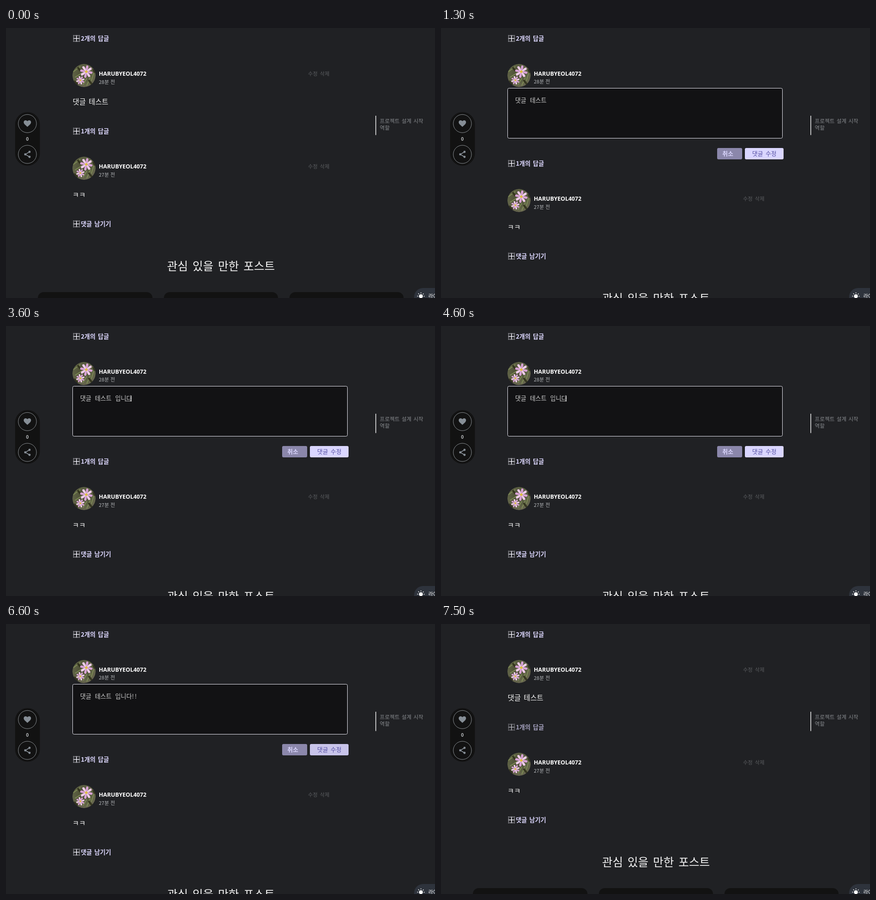
Write an HTML page that moves like this. It is 943 by 594 pixels and loops after 8000 ms.

```html
<!DOCTYPE html>
<html lang="ko">
<head>
<meta charset="utf-8">
<title>댓글 수정</title>
<style>
  html, body { margin: 0; width: 100%; height: 100%; overflow: hidden; background: #202124; }
  svg { display: block; width: 943px; height: 594px; }
  text { font-family: "Noto Sans CJK KR", "Noto Sans CJK", sans-serif; white-space: pre; }
  .reply { font-size: 13.3px; font-weight: 700; fill: #dcd7ff; word-spacing: 1.5px; }
  .name { font: 700 12.5px "Open Sans", sans-serif; fill: #fff; }
  .age { font-size: 11px; fill: #b4b7ba; }
  .action { font-size: 11.3px; fill: #5b5d60; }
  .body { font-size: 15.7px; fill: #f4f4f4; word-spacing: 2px; }
  .toc { font-size: 11.9px; fill: #85888c; word-spacing: .8px; }
  .heading { font-size: 25px; fill: #f4f4f4; word-spacing: 3px; }
  .input { font-size: 13.3px; font-weight: 300; fill: #cfcfcf; word-spacing: 4.2px; }
  .bang { letter-spacing: 2.1px; }
  .button { font-size: 13px; font-weight: 500; word-spacing: 2px; }
</style>
</head>
<body>
<svg viewBox="0 0 943 594">
  <defs>
    <radialGradient id="grass" cx=".45" cy=".4" r=".65">
      <stop offset="0" stop-color="#4b4c33"/>
      <stop offset=".6" stop-color="#5c6043"/>
      <stop offset="1" stop-color="#6b6853"/>
    </radialGradient>
    <clipPath id="round"><circle r="25.5"/></clipPath>
    <g id="petals">
      <path id="petal" d="M0 0C-3-5-3.500-12-1.500-14L2-13C3-10 2.500-5 0 0Z" fill="#d9a3d6"/>
    </g>
    <g id="avatar" clip-path="url(#round)">
      <circle r="25.5" fill="url(#grass)"/>
      <path d="M-24-8L-8-20M-20 4L-4-6M6 22L14 4M-2 20L6 6M16 12L22-8" stroke="#7d8a55" stroke-width="2"/>
      <path d="M-14-18l6 8M10 10l8 10M-22 12l8 8M20-14l4 8" stroke="#34351f" stroke-width="4"/>
      <use href="#petals" transform="translate(5 -8.500) rotate(12)"/>
      <circle cx="5" cy="-8.500" r="2.800" fill="#dcc03c"/>
      <use href="#petals" transform="translate(-8 10.500) scale(.68) rotate(30)"/>
      <circle cx="-8" cy="10.500" r="2" fill="#dcc03c"/>
    </g>
    <g id="grid" fill="none" stroke="#f0eff8" stroke-width="2" transform="scale(.8)">
      <path d="M4 4H20V20H4Z" stroke-dasharray="2" stroke-dashoffset="1"/>
      <path d="M12 3V21M3 12H21"/>
    </g>
  </defs>

  <rect width="943" height="594" fill="#202124"/>

  <use href="#grid" x="145.4" y="13.4"/>
  <text class="reply" x="164.5" y="27.5">2개의 답글</text>

  <use href="#avatar" x="171.5" y="104.5"/>
  <text class="name" x="204" y="104.5">HARUBYEOL4072</text>
  <text class="age" id="firstAge" x="204" y="123">28분 전</text>

  <g id="reading">
    <text class="action" id="edit" x="664" y="105">수정</text>
    <text class="action" x="690" y="105">삭제</text>
    <text class="body" x="146.5" y="168">댓글 테스트</text>
  </g>

  <g id="editor">
    <rect x="146.5" y="132.5" width="604" height="110" rx="3" fill="#121214" stroke="#e9e8f2"/>
    <text class="input" x="163" y="164"><tspan id="typed"></tspan><tspan class="bang" id="bangs"></tspan></text>
    <rect id="underline" y="164.5" width="12" height="1" fill="#cfcfcf"/>
    <rect id="caret" y="153" width="1" height="13" fill="#e4e4e4"/>
    <rect x="607" y="264" width="55" height="25" rx="3" fill="#8b87ab"/>
    <text class="button" x="618.5" y="281.3" fill="#d8d4fb" style="font-weight: 700">취소</text>
    <rect id="save" x="668" y="264" width="85" height="25" rx="3"/>
    <text class="button" x="684" y="281.3" fill="#5650a4">댓글 수정</text>
  </g>

  <g id="below">
    <g id="replies">
      <use href="#grid" x="145.4" y="217.4"/>
      <text class="reply" x="164.5" y="231.5">1개의 답글</text>
    </g>
    <use href="#avatar" x="171.5" y="308.5"/>
    <text class="name" x="204" y="308.5">HARUBYEOL4072</text>
    <text class="age" x="204" y="327">27분 전</text>
    <text class="action" x="664" y="309">수정</text>
    <text class="action" x="690" y="309">삭제</text>
    <text class="body" x="146" y="373">ㅋㅋ</text>
    <use href="#grid" x="145.4" y="421.4"/>
    <text class="reply" x="164.5" y="435.5">댓글 남기기</text>
    <text class="heading" x="354" y="532.5">관심 있을 만한 포스트</text>
    <g fill="#121212">
      <rect x="70" y="581" width="252" height="60" rx="13"/>
      <rect x="347" y="581" width="251" height="60" rx="13"/>
      <rect x="623" y="581" width="251" height="60" rx="13"/>
    </g>
  </g>

  <rect x="20" y="185" width="54.5" height="118" rx="27" fill="#121212"/>
  <g fill="none" stroke="#8b9094">
    <circle cx="47" cy="210.3" r="20"/>
    <circle cx="47" cy="278" r="20"/>
  </g>
  <path d="M47 217.500L41 212C37 207.500 39.500 203 43 203Q45.500 203 47 205Q48.500 203 51 203C54.500 203 57 207.500 53 212Z" fill="#868e96"/>
  <text x="47" y="248" text-anchor="middle" font-size="10" font-weight="700" fill="#c6c9cb">0</text>
  <g fill="#868e96">
    <path d="M51.500 272.500L42.500 278L51.500 283.500" fill="none" stroke="#868e96" stroke-width="1.7"/>
    <circle cx="51.700" cy="272.500" r="2.400"/>
    <circle cx="42.300" cy="278" r="2.400"/>
    <circle cx="51.700" cy="283.500" r="2.400"/>
  </g>

  <rect x="812" y="193" width="1.600" height="42.500" fill="#e6e6e6"/>
  <text class="toc" x="821.500" y="209">프로젝트 설계 시작</text>
  <text class="toc" x="821.500" y="224">역할</text>

  <rect x="897" y="572" width="90" height="44" rx="20" fill="#2e333c"/>
  <circle cx="912" cy="590" r="4.300" fill="#fff"/>
  <circle cx="912" cy="590" r="7.200" fill="none" stroke="#fff" stroke-width="2" stroke-dasharray="1.600 4.055" stroke-dashoffset=".8"/>
  <text x="928.500" y="593.500" font-size="11" font-weight="500" fill="#fff">라이트</text>
</svg>
<script>
const LOOP = 8000, SHIFT = 71;
const $ = id => document.getElementById(id);
const show = (id, on) => $(id).setAttribute("visibility", on ? "visible" : "hidden");

const petals = $("petals");
for (let i = 1; i < 8; i++) {
  const petal = $("petal").cloneNode();
  petal.removeAttribute("id");
  petal.setAttribute("transform", `rotate(${i * 45})`);
  if (i % 2) petal.setAttribute("fill", "#f0cdea");
  petals.append(petal);
}

// start, text added, exclamation marks, caret x (0 hides it), composing
const typing = [
  [1300, "", "", 0],
  [2100, "", "", 231],
  [2600, "", "", 0],
  [2800, " ", "", 238],
  [3000, " ㅇ", "", 250, true],
  [3200, " 이", "", 250, true],
  [3300, " 입", "", 250, true],
  [3500, " 입니", "", 263, true],
  [3600, " 입니다", "", 275, true],
  [3700, " 입니다ㅏ", "", 288, true],
  [4200, " 입니다", "", 275],
  [4400, " 입니", "", 263],
  [4600, " 입니다", "", 275, true],
  [5000, " 입니다", "!", 282],
  [5100, " 입니다", "!!", 288],
  [5600, " 입니다", "!!", 0],
  [6100, " 입니다", "!!", 288],
  [6600, " 입니다", "!!", 0]
];

function render(t) {
  const editing = t >= 1300 && t < 7100;
  show("reading", !editing);
  show("editor", editing);
  $("below").setAttribute("transform", `translate(0 ${editing ? SHIFT : 0})`);
  $("firstAge").setAttribute("y", editing ? 122 : 123);
  $("edit").setAttribute("opacity", t >= 800 && t < 1300 ? .7 : 1);
  $("replies").setAttribute("opacity", t >= 7500 ? .7 : 1);
  $("save").setAttribute("fill", t < 6200 ? "#dad6ff" : t < 6300 ? "#d0ccf4" : "#c8c4ea");

  const [, text, bangs, caret, composing] = typing.findLast(s => s[0] <= t) || typing[0];
  $("typed").textContent = "댓글 테스트" + text;
  $("bangs").textContent = bangs;
  $("caret").setAttribute("x", caret);
  $("underline").setAttribute("x", caret - 12);
  show("caret", editing && caret > 0);
  show("underline", editing && composing);
}

const start = performance.now();
function tick() {
  render((performance.now() - start) % LOOP);
  requestAnimationFrame(tick);
}
render(0);
requestAnimationFrame(tick);
</script>
</body>
</html>
```
